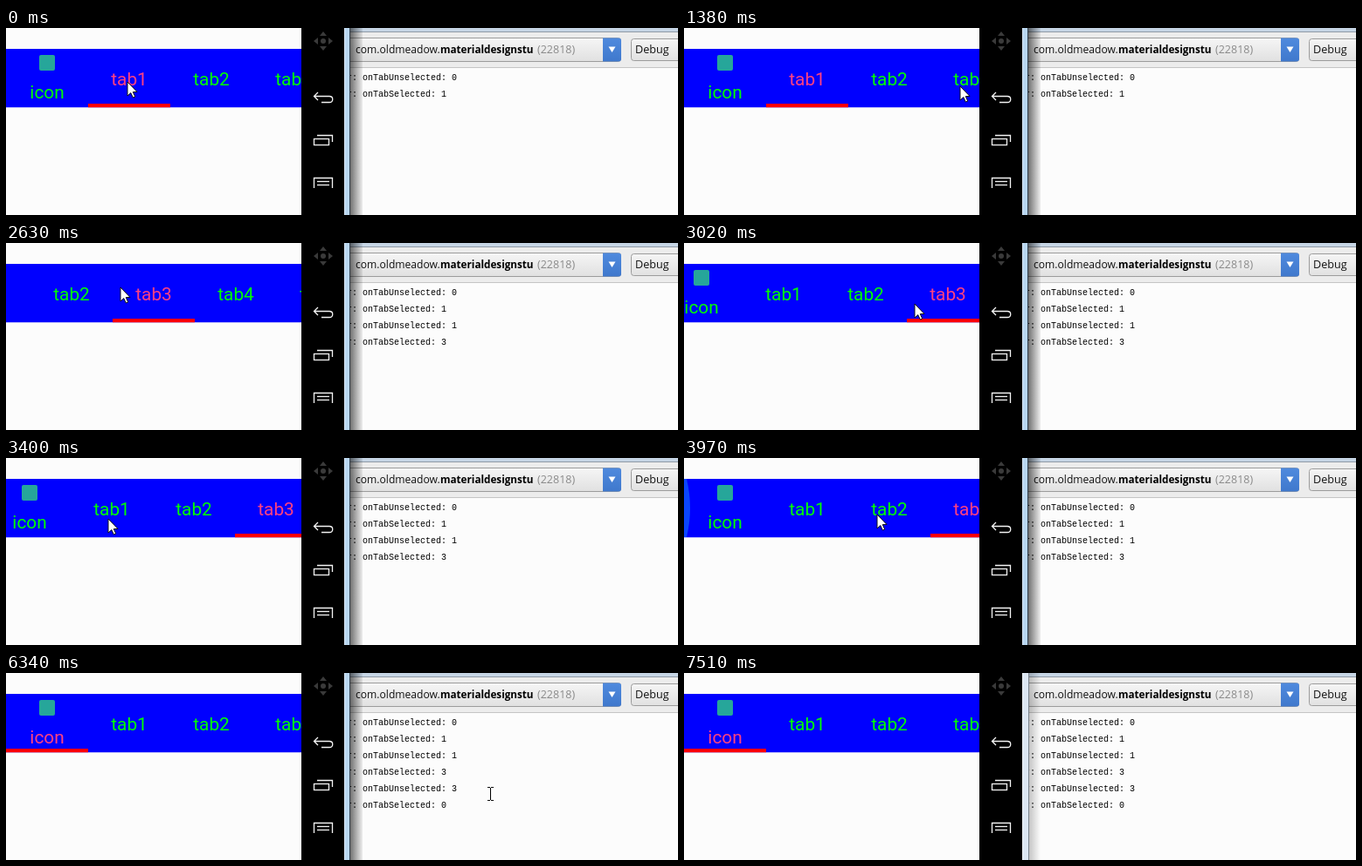
An HTML page with a canvas that plays this animation: 769 by 215 pixels, repeating every 7.61 s.

```html
<!DOCTYPE html>
<html lang="en">
<head>
<meta charset="utf-8">
<title>Tab selection log</title>
<style>
html, body { margin: 0; width: 100%; height: 100%; overflow: hidden; background: #fcfcfc; }
canvas { display: block; }
</style>
</head>
<body>
<canvas id="stage" width="769" height="215"></canvas>
<script>
const ctx = document.getElementById('stage').getContext('2d');
const W = 769, H = 215, LOOP = 7610;
const TAB = 94, PHONE = 338, EDITOR = 394;
const BLUR_AT = 7510;
const UI = '"Open Sans", "Noto Sans", sans-serif';

// The tab tapped at each moment; tab 1 is already open when the loop starts.
const taps = [{ at: -1000, tab: 1 }, { at: 1650, tab: 3 }, { at: 4910, tab: 0 }];
const LOG_DELAY = 120;

const ease = p => p * p * (3 - 2 * p);

// Eases from one value to the next; each move is [begin, end, value].
function follow(t, value, moves) {
  for (const [begin, end, goal] of moves) {
    const p = Math.min(1, Math.max(0, (t - begin) / (end - begin)));
    value += (goal - value) * ease(p);
  }
  return value;
}

// Eases a point along stops of [begin, end, x, y].
function travel(t, [x, y], stops) {
  return [
    follow(t, x, stops.map(([b, e, gx]) => [b, e, gx])),
    follow(t, y, stops.map(([b, e, , gy]) => [b, e, gy]))
  ];
}

const mouse = t => travel(t, [139, 62], [
  [400, 710, 238, 67],
  [850, 1220, 316, 67],
  [1850, 1950, 299, 86],
  [2220, 2610, 131, 51],
  [2650, 3020, 264, 70],
  [3020, 3270, 110, 70],
  [3270, 3390, 117, 70],
  [3520, 3960, 221, 65],
  [4000, 4380, 46, 49],
  [5770, 6190, 327, 107],
  [6190, 6340, 554, 139],
  [6340, 6650, 570, 131],
  [6650, 7080, 691, 211],
  [7080, 7230, 705, 240]
]);

const scroll = t => follow(t, 0, [
  [1600, 1930, 160], [2650, 3020, 27], [3270, 3390, 20], [3600, 3730, 0]
]);

const glow = t => follow(t, 0, [[3730, 3950, 1], [4000, 4480, 0]]);

const marker = t => follow(t, TAB, taps.map(({ at, tab }) => [at - 50, at + 240, tab * TAB]));

const selected = t => taps.filter(tap => tap.at <= t).pop().tab;

function logLines(t) {
  const lines = [];
  let last = 0;
  for (const { at, tab } of taps) {
    if (t >= at + LOG_DELAY) lines.push('onTabUnselected: ' + last, 'onTabSelected: ' + tab);
    last = tab;
  }
  return lines;
}

function rect(x, y, w, h, fill) {
  ctx.fillStyle = fill;
  ctx.fillRect(x, y, w, h);
}

function text(str, x, y, font, fill, align = 'left') {
  ctx.font = font;
  ctx.fillStyle = fill;
  ctx.textAlign = align;
  ctx.fillText(str, x, y);
}

function poly(points, fill, stroke, close = true) {
  ctx.beginPath();
  points.forEach(([x, y]) => ctx.lineTo(x, y));
  if (close) ctx.closePath();
  if (fill) { ctx.fillStyle = fill; ctx.fill(); }
  if (stroke) { ctx.strokeStyle = stroke; ctx.stroke(); }
}

function box(x, y, w, h, r, fill, stroke) {
  ctx.beginPath();
  ctx.roundRect(x, y, w, h, r);
  ctx.fillStyle = fill;
  ctx.fill();
  if (stroke) { ctx.strokeStyle = stroke; ctx.stroke(); }
}

function fade(x0, y0, x1, y1, from, to) {
  const g = ctx.createLinearGradient(x0, y0, x1, y1);
  g.addColorStop(0, from);
  g.addColorStop(1, to);
  return g;
}

function drawTabs(t) {
  const s = scroll(t), open = selected(t);
  ctx.save();
  ctx.beginPath();
  ctx.rect(0, 0, PHONE, H);
  ctx.clip();
  rect(0, 24, PHONE, 67.25, '#0000ff');

  ctx.globalAlpha = glow(t);
  ctx.beginPath();
  ctx.moveTo(0, 24);
  ctx.lineTo(3, 24);
  ctx.quadraticCurveTo(11, 57.5, 3, 91);
  ctx.lineTo(0, 91);
  ctx.fillStyle = '#0a46ff';
  ctx.fill();
  ctx.globalAlpha = 1;

  box(38 - s, 31, 18, 18, 2, '#26a69a');
  for (let i = 0; i < 6; i++) {
    text(i ? 'tab' + i : 'icon', TAB * (i + 0.5) - s, i ? 66 : 81,
      '20.8px Roboto, sans-serif', i === open ? '#ff4081' : '#00ff00', 'center');
  }
  rect(marker(t) - s, 87, TAB, 4.25, '#ff0000');
  ctx.restore();
}

function drawSidebar() {
  const line = '#f4f4f4', dim = '#3a3a3a';
  rect(PHONE, 0, 49, H, '#000');

  ctx.save();
  ctx.translate(363, 15);
  ctx.fillStyle = dim;
  ctx.beginPath();
  ctx.arc(0, 0, 3, 0, 7);
  ctx.fill();
  for (let i = 0; i < 4; i++) {
    ctx.rotate(Math.PI / 2);
    poly([[0, -11], [4, -6], [-4, -6]], dim);
  }
  ctx.restore();

  ctx.lineWidth = 1.3;
  ctx.strokeStyle = line;
  ctx.beginPath();
  ctx.moveTo(357, 74);
  ctx.lineTo(352.5, 78.5);
  ctx.lineTo(357, 83);
  ctx.moveTo(352.5, 78.5);
  ctx.lineTo(370, 78.5);
  ctx.bezierCurveTo(375, 78.5, 375, 85.5, 370, 85.5);
  ctx.lineTo(361, 85.5);
  ctx.stroke();

  ctx.strokeRect(352.5, 127.5, 17, 7);
  poly([[356, 123.5], [373.5, 123.5], [373.5, 131]], null, line, false);

  poly([[352.5, 184], [352.5, 172.5], [373.5, 172.5], [373.5, 184]], null, line, false);
  for (const y of [176.5, 180.5]) poly([[356, y], [370, y]], null, line, false);
  ctx.lineWidth = 1;
}

function drawToolbar() {
  const face = fade(0, 11, 0, 39, '#f6f6f6', '#e0e0e0');
  rect(EDITOR, 0, W - EDITOR, 45, '#ececec');
  rect(EDITOR, 0, W - EDITOR, 4, '#c6d5e5');
  rect(EDITOR, 4, W - EDITOR, 1, '#8f9aa6');
  rect(EDITOR, 45, W - EDITOR, 1, '#c4c4c4');
  box(390.5, 11.5, 313, 27, 3, face, '#9c9c9c');
  box(683, 11.5, 21, 27, [0, 3, 3, 0], fade(0, 11, 0, 39, '#4f8ade', '#3f78cc'));
  poly([[689.5, 21.5], [697.5, 21.5], [693.5, 28]], '#fff');
  box(715.5, 12.5, 70, 25, 3, face, '#9c9c9c');

  text('com.oldmeadow.', 400, 29, '12.1px ' + UI, '#111');
  text('materialdesignstu', 497, 29, 'bold 11.7px ' + UI, '#000');
  text('(22818)', 608, 29, '12.5px ' + UI, '#8a8a8a');
  text('Debug', 720, 29, '12.6px ' + UI, '#111');
}

function drawLog(t) {
  logLines(t).forEach((line, i) => {
    text('r: ' + line, 390, 60 + i * 19, '10px "Liberation Mono", monospace', '#000');
  });
}

// Border of the phone window and the shadow it casts on the editor.
function drawFrame(active) {
  const edge = active ? EDITOR : EDITOR + 1;
  const [dark, soft] = active ? [0.55, 0.06] : [0.22, 0];
  rect(edge, 0, 408 - edge, H, fade(edge, 0, 408, 0, `rgba(0,0,0,${dark})`, `rgba(0,0,0,${soft})`));
  rect(387, 0, edge - 387, H, active ? '#b9d7f1' : '#dce7f3');
  rect(387, 0, 1, H, active ? '#dceaf7' : '#f2f6fa');
  rect(edge - 1, 0, 1, H, active ? '#34424f' : '#7c858e');
}

function drawArrow(x, y) {
  ctx.save();
  ctx.translate(x, y);
  poly([[0, 0], [0, 16], [3.8, 12.6], [6.3, 18], [8.7, 17], [6.3, 11.6], [11, 11.4]],
    '#fff', '#111');
  ctx.restore();
}

function drawBeam(x, y) {
  const left = Math.round(x) - 3, top = Math.round(y) - 8;
  rect(left + 3, top + 1, 1, 14, '#000');
  for (const end of [top, top + 15]) {
    rect(left, end, 3, 1, '#000');
    rect(left + 4, end, 3, 1, '#000');
  }
}

function drawMouse(t) {
  const [x, y] = mouse(t);
  (x > EDITOR && y > 45 ? drawBeam : drawArrow)(x, y);
}

function draw(t) {
  rect(0, 0, W, H, '#fcfcfc');
  drawTabs(t);
  drawToolbar();
  drawLog(t);
  drawFrame(t < BLUR_AT);
  drawSidebar();
  drawMouse(t);
}

const start = performance.now();
function tick() {
  draw((performance.now() - start) % LOOP);
  requestAnimationFrame(tick);
}
tick();
</script>
</body>
</html>
```
